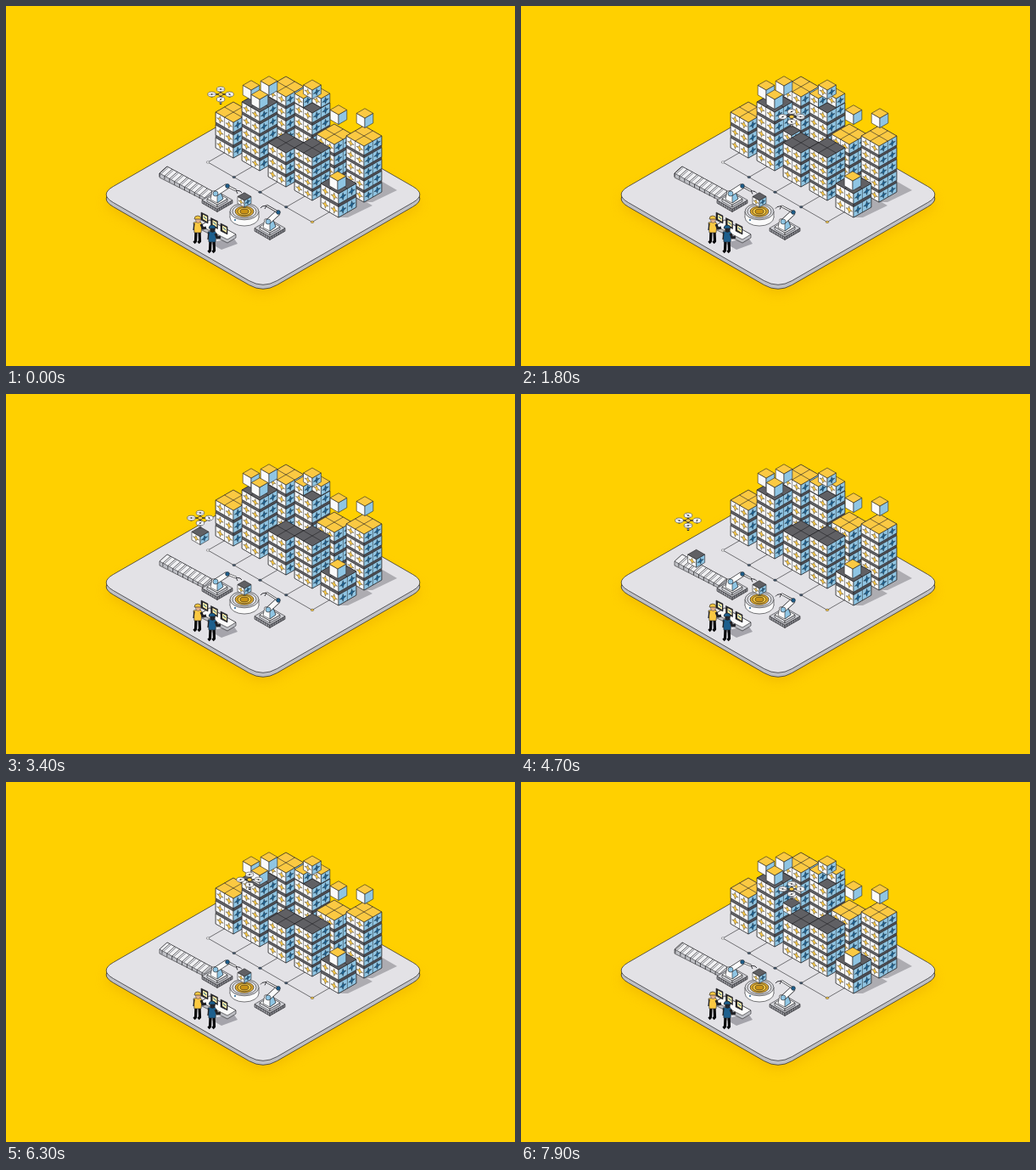
Write an HTML page with a canvas that moves like this. It is 600 px wide and 424 px high and loops after 8000 ms.

```html
<!DOCTYPE html>
<html lang="en">
<head>
<meta charset="utf-8">
<title>Block factory</title>
<style>
  html, body { margin: 0; width: 100%; height: 100%; overflow: hidden; background: #ffd000; }
  canvas { display: block; width: 600px; height: 424px; }
</style>
</head>
<body>
<canvas id="stage"></canvas>
<script>
const LOOP = 8000, CYCLE = 5900;
const PICK = 1300, DROP = 4150, GONE = 5700;
const SLOPE = 0.575, CELL = 10.4;
const INK = '#222226', WHITE = '#fafafa', BLUE = '#8fc5e3', NAVY = '#1d5f8d';
const GOLD = '#fbc942', DARK = '#606064', GREY = '#bfc0c5', FLOOR = '#e3e2e6';

const canvas = document.getElementById('stage');
const dpr = window.devicePixelRatio || 1;
canvas.width = 600 * dpr;
canvas.height = 424 * dpr;
let g = canvas.getContext('2d');

// Waypoints of one round trip: time, x, y
const TRIP = [
  [0, 253, 104], [400, 287, 115], [900, 319, 128], [PICK, 319, 145], [2000, 319, 126],
  [2500, 310, 124], [3400, 229, 146], [DROP, 197, 166], [4700, 197, 149]
];

function waypoint(i) {
  const n = TRIP.length, lap = Math.floor(i / n), [t, x, y] = TRIP[i - lap * n];
  return [t + lap * CYCLE, x, y];
}

// Smooth path through the waypoints that never overshoots them.
function flight(t, axis) {
  const speed = i => {
    const a = waypoint(i), b = waypoint(i + 1);
    return (b[axis] - a[axis]) / (b[0] - a[0]);
  };
  const tangent = i => {
    const p = speed(i - 1), q = speed(i);
    return p * q <= 0 ? 0 : 2 * p * q / (p + q);
  };
  const i = TRIP.filter(p => p[0] <= t).length - 1;
  const a = waypoint(i), b = waypoint(i + 1), span = b[0] - a[0];
  const k = (t - a[0]) / span, ease = k * k * (3 - 2 * k);
  return a[axis] + (b[axis] - a[axis]) * ease
    + span * k * (1 - k) * (tangent(i) * (1 - k) - tangent(i + 1) * k);
}

function paint(fill, line, width) {
  if (fill) { g.fillStyle = fill; g.fill(); }
  if (line) { g.strokeStyle = line; g.lineWidth = width; g.stroke(); }
}

function poly(pts, fill, line = INK, width = 0.6) {
  g.beginPath();
  pts.forEach(p => g.lineTo(p[0], p[1]));
  g.closePath();
  paint(fill, line, width);
}

function wire(pts, line = INK, width = 0.6) {
  g.beginPath();
  pts.forEach(p => g.lineTo(p[0], p[1]));
  paint(null, line, width);
}

function oval(x, y, rx, ry, fill, line = INK, width = 0.6) {
  g.beginPath();
  g.ellipse(x, y, rx, ry, 0, 0, Math.PI * 2);
  paint(fill, line, width);
}

// Side face of a block whose front top corner is x, y.
function face(x, y, w, h, right, fill, cells = 0) {
  const side = right ? 1 : -1;
  const at = (u, v) => [x + side * u * w, y - u * w * SLOPE + v * h];
  poly([at(0, 0), at(1, 0), at(1, 1), at(0, 1)], fill);
  for (let c = 0; c < cells; c++) {
    if (c) wire([at(c / cells, 0), at(c / cells, 1)], INK, 0.5);
    const star = Array.from({ length: 8 }, (_, i) => {
      const r = i % 2 ? 0.13 : 0.36, a = i * Math.PI / 4;
      return at((c + 0.5 + r * Math.cos(a)) / cells, 0.5 + r * Math.sin(a));
    });
    poly(star, right ? NAVY : GOLD, INK, 0.4);
  }
}

function lid(x, y, w, fill, split) {
  const d = w * SLOPE;
  poly([[x, y], [x - w, y - d], [x, y - 2 * d], [x + w, y - d]], fill);
  if (!split) return;
  for (const s of [-1, 1]) wire([[x + s * w / 2, y - d / 2], [x - s * w / 2, y - d * 1.5]]);
}

function box(x, y, w, h, top, left = WHITE, right = BLUE, cells = 0) {
  face(x, y, w, h, false, left, cells);
  face(x, y, w, h, true, right, cells);
  lid(x, y, w, top);
}

function tower(x, top, base, color) {
  const w = CELL * 2, layers = Math.round((base - top) / 14);
  const pitch = (base - top) / (layers - 0.22);
  box(x, top, w, base - top, color, DARK, '#4c4c51');
  for (let i = 0; i < layers; i++) {
    face(x, top + i * pitch, w, pitch * 0.78, false, WHITE, 2);
    face(x, top + i * pitch, w, pitch * 0.78, true, BLUE, 2);
  }
  lid(x, top, w, color, true);
}

const crate = (x, y, top = DARK, w = 10, h = 9.5) => box(x, y, w, h, top, WHITE, BLUE, 1);
const floater = (x, y) => box(x, y, 9.8, 11.5, GOLD);

// Rhombus with softened corners.
function slab(lift, fill, line) {
  const corners = [[-193, 0], [0, -111], [193, 0], [0, 111]].map(([x, y]) => [303 + x, 222 + y + lift]);
  const cut = 0.085;
  g.beginPath();
  corners.forEach((c, i) => {
    const toward = n => [0, 1].map(a => c[a] + (corners[n % 4][a] - c[a]) * cut);
    g.lineTo(...toward(i + 3));
    g.quadraticCurveTo(...c, ...toward(i + 1));
  });
  g.closePath();
  paint(fill, line, 0.7);
}

function ground() {
  g.fillStyle = '#ffd000';
  g.fillRect(0, 0, 600, 424);
  g.save();
  g.filter = 'blur(7px)';
  slab(10, 'rgba(225,160,0,.4)');
  g.restore();
  slab(5, GREY, INK);
  slab(0, FLOOR, INK);

  for (const [x, y] of [[421, 231], [392, 249]])
    poly([[x, y], [x + 21, y - 25], [x + 40, y - 14], [x + 11, y]], 'rgba(90,90,98,.4)', null);
  poly([[240, 279], [268, 273], [273, 280], [254, 287]], 'rgba(90,90,98,.45)', null);

  wire([[238, 184], [361, 254.5]]);
  for (let i = 0; i < 5; i++) {
    const x = 238 + i * 30.75, y = 184 + i * 17.6;
    wire([[x, y], [x + 26, y - 15]]);
    oval(x, y, 1.8, 1.2, i === 4 ? GOLD : i ? '#40566a' : WHITE, INK, 0.4);
  }
}

function belt(t) {
  const slats = 9, run = 53, shift = (t / 600) % 1;
  poly([[181, 197], [190, 189], [243, 218], [243, 222], [234, 229], [181, 202]], GREY);
  poly([[181, 197], [190, 189], [243, 218], [234, 226]], '#f0f0f2');
  for (let i = 0; i < slats; i++) {
    const dx = run * (i + shift) / slats, x = 181 + dx, y = 197 + dx * 0.55;
    wire([[x, y + 4], [x, y], [x + 9, y - 8]], INK, 0.7);
    wire([[x + 1.6, y + 1], [x + 10.6, y - 7]], '#85868c', 1);
  }
}

function beltCrate(ph) {
  if (ph < DROP || ph > GONE) return;
  const dx = 37 * Math.pow((ph - DROP) / (GONE - DROP), 1.3);
  g.save();
  g.globalAlpha = Math.min(1, (GONE - ph) / 150);
  crate(197 + dx, 189 + dx * 0.6);
  g.restore();
}

function limb(pts, width) {
  wire(pts, INK, width + 1.2);
  wire(pts, WHITE, width);
}

// x, y is the shoulder; the elbow and claw follow from it.
function robot(x, y, elbow, claw) {
  const by = y + 18;
  box(x + 2, by, 18, 3.5, '#d2d3d8', '#9b9ca2', '#85868c');
  for (let i = 1; i < 7; i++)
    for (const s of [-1, 1]) {
      const px = x + 2 + s * i * 2.6, py = by - i * 1.5;
      wire([[px, py], [px, py + 3.5]], INK, 0.5);
    }
  box(x + 2, by - 5, 12, 3, WHITE, '#dcdde1', GREY);
  poly([[x - 6, y + 7], [x - 4, y - 3], [x + 5, y - 4], [x + 9, y + 6], [x + 2, y + 11]], WHITE);
  poly([[x + 2, y + 11], [x + 2, y - 1], [x + 5, y - 4], [x + 9, y + 6]], BLUE);
  const ex = x + elbow[0], ey = y + elbow[1], cx = ex + claw[0], cy = ey + claw[1];
  limb([[x, y], [ex, ey]], 5.5);
  limb([[ex, ey], [cx, cy]], 1.4);
  const s = Math.sign(claw[0]);
  wire([[cx, cy], [cx + 5 * s, cy + 1], [cx + 7 * s, cy + 3]], INK, 0.9);
  wire([[cx, cy], [cx + 2 * s, cy + 4]], INK, 0.9);
  oval(x, y, 3, 3, BLUE);
  oval(ex, ey, 2.4, 2.4, NAVY);
}

function robots(t) {
  const sway = Math.sin(t / 700);
  robot(247, 221, [14, -9], [10, 5 + sway]);
  robot(309, 254, [12, -11], [-14, -8 + sway]);
}

function turntable() {
  oval(281, 249, 17, 10, WHITE);
  g.fillStyle = WHITE;
  g.fillRect(264, 242, 34, 7);
  for (const x of [264, 298]) wire([[x, 242], [x, 249]]);
  ['#d6d7db', '#e8e8eb', '#d9a52c', GOLD, '#c99216'].forEach((color, i) => {
    const r = 17 - i * 3;
    oval(281, 242, r, r * 0.58, color);
  });
  crate(281, 229, DARK, 8, 8);
  oval(270, 252, 1, 1, NAVY, null);
}

function screen(x, y) {
  poly([[x - 4, y - 6], [x + 4, y - 2], [x + 4, y + 7], [x - 4, y + 3]], INK);
  poly([[x - 2, y - 3.5], [x + 3, y - 1], [x + 3, y + 5], [x - 2, y + 2]], '#f7e7a5', null);
  wire([[x - 1, y - 1], [x + 2, y + 2]], NAVY, 1);
}

function worker(x, y, color, skin) {
  for (const s of [-1, 1])
    wire([[x + 2 * s, y + 13], [x + 2.5 * s, y + 26], [x + 2.5 * s - 2, y + 28]], '#09090b', 3.2);
  poly([[x - 5, y + 4], [x + 3, y + 3], [x + 5, y + 6], [x + 4, y + 16], [x - 4, y + 16]], color);
  wire([[x + 4, y + 6], [x + 6, y + 11], [x + 10, y + 10]], INK, 3);
  wire([[x - 4, y + 5], [x - 5, y + 13]], INK, 1.4);
  oval(x + 0.5, y + 1, 3, 3.5, skin, INK, 0.4);
  g.beginPath();
  g.arc(x, y, 4, Math.PI, 0);
  g.closePath();
  paint(color, INK, 0.6);
}

function desk() {
  poly([[229, 259], [240, 252], [271, 269], [271, 273], [261, 279], [229, 263]], GREY);
  poly([[229, 259], [240, 252], [271, 269], [261, 275]], WHITE);
  for (let i = 0; i < 3; i++) screen(234 + i * 11.5, 249 + i * 6.5);
  worker(226, 251, GOLD, '#e2b18d');
  worker(243, 262, NAVY, '#23262c');
}

function backTowers() {
  tower(268, 137, 179, GOLD);
  tower(330, 107, 190, GOLD);
  tower(361, 126, 196, DARK);
  for (const s of [-1, 1]) crate(361 + s * CELL, 109, GOLD, CELL, 10.5);
  crate(361, 99, GOLD, CELL, 10.5);
  tower(299, 125, 194, DARK);
  floater(310, 94);
  floater(289, 99);
  floater(299, 110);
}

function frontTowers() {
  tower(387, 163, 231, GOLD);
  tower(330, 173, 213, DARK);
  tower(361, 179, 229, DARK);
  tower(422, 165, 231, GOLD);
  tower(392, 221, 249, DARK);
  floater(391, 206);
  floater(392, 128);
  floater(423, 132);
}

function drone(ph) {
  const x = flight(ph, 1), y = flight(ph, 2);
  if (ph >= PICK && ph < DROP) crate(x, y + 22);
  wire([[x, y], [x, y + 12]], INK, 2.4);
  wire([[x, y + 3], [x, y + 11]], WHITE, 1.1);
  for (const [dx, dy] of [[1, 0], [0, 1]])
    wire([[x - 10 * dx, y - 6 * dy], [x + 10 * dx, y + 6 * dy]], INK, 1.4);
  oval(x, y, 2.8, 2, GOLD);
  for (let i = 0; i < 4; i++) {
    const arm = i * Math.PI / 2 - Math.PI / 2, spin = ph / 45 + i;
    const cx = x + 10.5 * Math.cos(arm), cy = y + 6 * Math.sin(arm);
    const bx = Math.cos(spin) * 4, by = Math.sin(spin) * 2.2;
    wire([[cx, cy], [cx, cy + 3.5]], INK, 2);
    oval(cx, cy, 4.8, 2.9, '#f7f7f7', '#55555a', 0.7);
    wire([[cx - bx, cy - by], [cx + bx, cy + by]], '#85868c', 0.7);
    oval(cx, cy, 1, 0.7, INK, null);
  }
}

// Draws still parts once on their own sheet.
function layer(draw) {
  const sheet = document.createElement('canvas');
  sheet.width = canvas.width;
  sheet.height = canvas.height;
  const main = g;
  g = sheet.getContext('2d');
  g.scale(dpr, dpr);
  g.lineJoin = 'round';
  draw();
  g = main;
  return sheet;
}

const back = layer(() => { ground(); backTowers(); });
const front = layer(() => { frontTowers(); turntable(); desk(); });
g.scale(dpr, dpr);
g.lineJoin = 'round';

const start = performance.now();
function frame() {
  const t = (performance.now() - start) % LOOP, ph = t % CYCLE;
  g.drawImage(back, 0, 0, 600, 424);
  belt(t);
  beltCrate(ph);
  drone(ph);
  g.drawImage(front, 0, 0, 600, 424);
  robots(t);
  requestAnimationFrame(frame);
}
frame();
</script>
</body>
</html>
```
